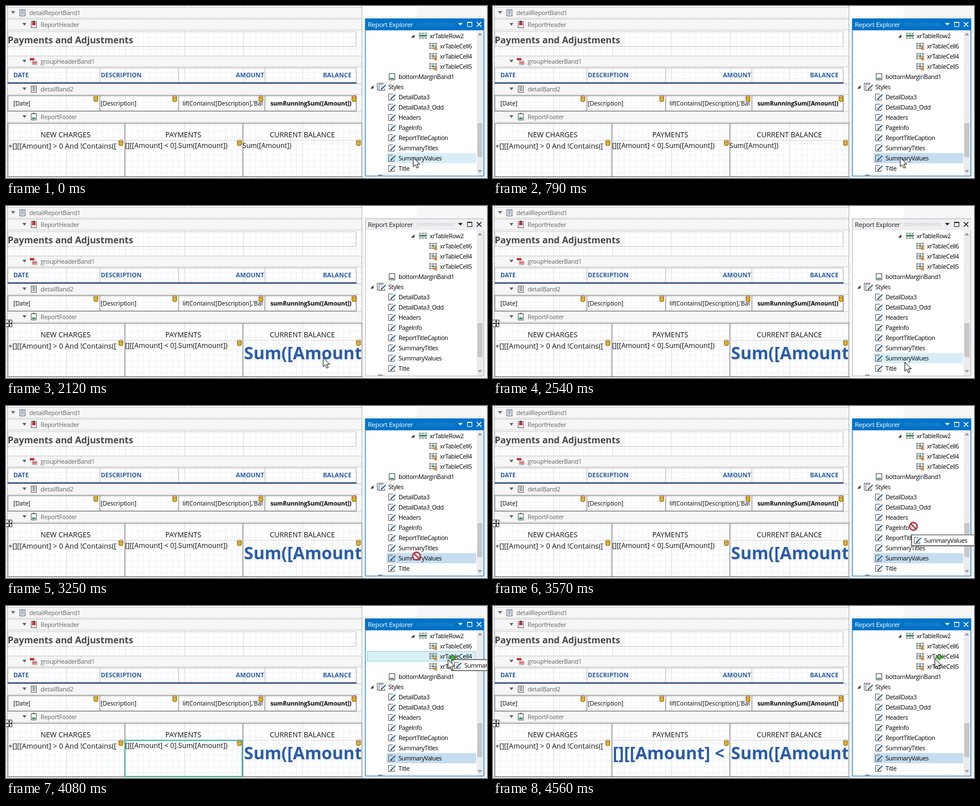
Recreate the animation shown at these times as an HTML page. Size 848 by 304 pixels, loop 5.29 s.

```html
<!DOCTYPE html>
<html lang="en">
<head>
<meta charset="utf-8">
<title>Report designer</title>
<style>
html, body { margin: 0; width: 100%; height: 100%; overflow: hidden; background: #fff; }
svg { display: block; }
text { font-family: "Open Sans", "Noto Sans", sans-serif; white-space: pre; }
.band { font-size: 10.8px; letter-spacing: -.25px; fill: #666; }
.tree { font-size: 10.8px; letter-spacing: -.4px; fill: #000; }
.title { font-size: 11.5px; letter-spacing: -.3px; }
.head { font-size: 10.9px; font-weight: 700; fill: #2a5caa; }
.row { font-size: 10.5px; }
.cell { font-size: 12.7px; fill: #111; }
.big { font-size: 30.2px; font-weight: 700; fill: #2a5caa; }

/* switches */
.show { opacity: 0; animation: 5290ms step-end infinite; }
.hover { animation-name: hover; }
.picked { animation-name: picked; }
.idle { animation-name: idle; }
.active { animation-name: active; }
.sum-small { animation-name: sumSmall; }
.sum-big { animation-name: sumBig; }
.pay-small { animation-name: paySmall; }
.pay-big { animation-name: payBig; }
.handle { animation-name: handle; }
.over-margin { animation-name: overMargin; }
.over-five { animation-name: overFive; }
.over-four { animation-name: overFour; }
.arrow { animation-name: arrow; }
.denied { animation-name: denied; }
.plus { animation-name: plus; }
.tag { animation-name: tag; }
@keyframes hover { 0%, 47.4% { opacity: 1 } 14.93%, 54%, 100% { opacity: 0 } }
@keyframes picked { 0%, 40.07% { opacity: 0 } 14.93%, 54%, 100% { opacity: 1 } }
@keyframes idle { 0%, 54%, 100% { opacity: 0 } 40.07% { opacity: 1 } }
@keyframes active { 0%, 54%, 100% { opacity: 1 } 40.07% { opacity: 0 } }
@keyframes sumSmall { 0% { opacity: 1 } 34.59%, 100% { opacity: 0 } }
@keyframes sumBig { 0% { opacity: 0 } 34.59%, 100% { opacity: 1 } }
@keyframes paySmall { 0% { opacity: 1 } 85.06%, 100% { opacity: 0 } }
@keyframes payBig { 0% { opacity: 0 } 85.06%, 100% { opacity: 1 } }
@keyframes handle { 0% { opacity: 0 } 40.07%, 100% { opacity: 1 } }
@keyframes overMargin { 0%, 73.72%, 100% { opacity: 0 } 71.45% { opacity: 1 } }
@keyframes overFive { 0%, 74.85%, 100% { opacity: 0 } 73.72% { opacity: 1 } }
@keyframes overFour { 0%, 85.06%, 100% { opacity: 0 } 74.85% { opacity: 1 } }
@keyframes arrow { 0%, 30.05%, 71.45%, 100% { opacity: 1 } 26.08%, 61.45% { opacity: 0 } }
@keyframes denied { 0%, 30.05%, 71.45%, 100% { opacity: 0 } 26.08%, 61.45% { opacity: 1 } }
@keyframes plus { 0%, 40.07% { opacity: 0 } 30.05%, 71.45%, 100% { opacity: 1 } 61.43% { opacity: 0 } }
@keyframes tag { 0%, 35.72%, 86.19%, 100% { opacity: 0 } 26.65%, 62% { opacity: 1 } }

/* paths */
.pointer { animation: pointer 5290ms linear infinite; }
.carry { animation: carry 5290ms linear infinite; }
@keyframes pointer {
  0%, 25% { transform: translate(718px, 268px) }
  26.65% { transform: translate(688px, 268px) }
  30.06% { transform: translate(627px, 269px) }
  31.19% { transform: translate(607px, 269px) }
  34.59%, 40% { transform: translate(557px, 268px) }
  44.61% { transform: translate(662px, 271px) }
  48.01%, 50.2% { transform: translate(726px, 276px) }
  54.63%, 60.9% { transform: translate(722px, 270px) }
  67.49% { transform: translate(741px, 213px) }
  70.89% { transform: translate(764px, 138px) }
  73.16% { transform: translate(779px, 119px) }
  74.86% { transform: translate(780px, 98px) }
  78.26%, 100% { transform: translate(779px, 93px) }
}
@keyframes carry {
  0%, 26.65% { transform: translate(675px, 268px) }
  31.19% { transform: translate(618px, 268px) }
  34.59%, 50% { transform: translate(563px, 268px) }
  50.1%, 62% { transform: translate(733px, 269px) }
  67.49% { transform: translate(737px, 227px) }
  70.89% { transform: translate(757px, 152px) }
  73.16% { transform: translate(779px, 123px) }
  76%, 100% { transform: translate(785px, 94px) }
}
</style>
</head>
<body>
<svg id="stage" width="848" height="304" viewBox="0 0 848 304"></svg>
<script>
const rect = (x, y, w, h, fill, more = '') =>
  `<rect x="${x}" y="${y}" width="${w}" height="${h}" fill="${fill}" ${more}/>`;
const box = (x, y, w, h, color, width = 1) =>
  rect(x + .5, y + .5, w, h, 'none', `stroke="${color}" stroke-width="${width}"`);
const path = (d, fill, more = '') => `<path d="${d}" fill="${fill}" ${more}/>`;
const line = (d, color, width = 1, more = '') =>
  path(d, 'none', `stroke="${color}" stroke-width="${width}" ${more}`);
const text = (x, y, cls, str, more = '') =>
  `<text x="${x}" y="${y}" class="${cls}" ${more}>${str.replace(/</g, '&lt;')}</text>`;
const at = (x, y, body) => `<g transform="translate(${x} ${y})">${body}</g>`;
const show = (cls, body) => `<g class="show ${cls}">${body}</g>`;
const END = 'text-anchor="end"', MID = 'text-anchor="middle"';

// icons, centred on 0,0
const sheet = body => rect(-4.5, -5.5, 9, 11, '#fff', 'stroke="#555"') + body;
const bars = (color, ys) => ys.map(y => rect(-2.5, y, 5, 1, color)).join('');
const icons = {
  report: sheet(bars('#3b6fb0', [-4, -2, 0, 2])),
  header: sheet(rect(-3, -4, 6, 5, '#d02c38') + rect(-2, -7, 4, 3, '#555')),
  group: rect(-7, -6, 8, 4, '#d02c38') + rect(-3, -1, 9, 1, '#777') +
    rect(-3, 1, 9, 3, '#d02c38', 'opacity=".75"') + rect(-3, 5, 9, 1, '#777'),
  detail: sheet(bars('#555', [-4, -2, 0, 2])),
  footer: sheet(rect(-3, 1, 6, 3, '#2e8b57') + rect(-2, -7, 4, 2, '#555')),
  margin: rect(-4.5, -5.5, 10, 11, '#fff', 'stroke="#444"') + rect(-3, 2, 7, 2, '#2e8b57'),
  style: line('M2-5.5H-5.5V5.5H4.5V2', '#555') + bars('#bbb', [-3, -1]) +
    line('M0 2L6.5-4.5', '#2b6ca8', 2) + path('M-2.5 4.5L-1.2 1L1 3.2z', '#111'),
  db: path('M-3.5-3.5V3.5Q0 6.5 3.5 3.5V-3.5z', '#f2b21b', 'stroke="#6f4e0c"') +
    '<ellipse cy="-3.5" rx="3.5" ry="1.6" fill="#ffe08a" stroke="#6f4e0c" stroke-width=".9"/>'
};
icons.styles = line('M-4 5.5H-7.5V-6.5H4', '#555') + at(1, 1, icons.style);
const tiles = (cols, color, y) =>
  Array.from({ length: cols }, (_, i) => rect(-7 + i * 5, y, 4, 3, color)).join('');
icons.row = tiles(3, '#aaa', -6) + rect(-7, -2, 14, 3, '#2e8b57') + tiles(3, '#aaa', 2);
icons.cell = tiles(3, '#999', -6) + tiles(3, '#999', -2) + rect(-2, -2, 4, 3, '#2e8b57') +
  tiles(2, '#999', 2) + rect(2, 1, 5, 6, '#d98b3a', 'rx="1.5"');

function band(y, x, icon, name) {
  return rect(3, y - 10, 624, 20, '#f6f6f6') +
    line(`M3 ${y - 9.5}H627M3 ${y + 9.5}H627`, '#c9c9c9') +
    path(`M${x - 32} ${y - 3}h7l-3.5 5z`, '#666') +
    at(x - 12, y, icons[icon]) + text(x, y + 4, 'band', name);
}

function gridLines() {
  let d = '';
  for (let x = 13; x < 627; x += 10.4) d += `M${Math.round(x) + .5} 0V302`;
  for (let y = 3; y < 302; y += 10.4) d += `M3 ${Math.round(y) + .5}H627`;
  return line(d, '#f0f1f3') + line('M106.5 0V302M210.5 0V302M314.5 0V302M418.5 0V302M522.5 0V302', '#e2e5ea');
}

const clipped = (x, w, body) => `<svg x="${x}" y="238" width="${w}" height="63">${body}</svg>`;

function report() {
  return rect(724, 0, 124, 304, '#f7f7f7') + gridLines() +
    band(12, 41, 'report', 'detailReportBand1') +
    band(33, 61, 'header', 'ReportHeader') +
    band(98, 61, 'group', 'groupHeaderBand1') +
    band(147, 61, 'detail', 'detailBand2') +
    band(196, 61, 'footer', 'ReportFooter') +
    line('M2.5 0V304M627.5 0V304', '#999', 1, 'stroke-dasharray="3 1"') +
    line('M0 302.5H633', '#aaa', 1, 'stroke-dasharray="3 1"') +
    box(3, 45, 614, 26, '#c4c4c4') +
    text(3, 66, '', 'Payments and Adjustments', 'font-size="16.1" font-weight="700" fill="#444"') +
    box(3, 109, 614, 27, '#b5b5b5') +
    line('M165.5 109V136M304.5 109V136M456.5 109V136', '#b5b5b5') +
    rect(3, 135, 615, 2, '#1f3d78') +
    text(13, 126, 'head', 'DATE') + text(167, 126, 'head', 'DESCRIPTION') +
    text(455, 126, 'head', 'AMOUNT', END) + text(609, 126, 'head', 'BALANCE', END) +
    box(3, 158, 614, 27, '#777') +
    line('M165.5 158V185M304.5 158V185M456.5 158V185', '#777') +
    text(13, 176, 'row', '[Date]') + text(167, 176, 'row', '[Description]') +
    text(311, 176, 'row', "Iif(Contains([Description],'Bal") +
    text(609, 176, '', 'sumRunningSum([Amount])', END + ' font-size="10.3" font-weight="700"') +
    box(3, 207, 624, 94, '#777') +
    line('M209.5 207V301M417.5 207V301', '#777') + line('M3 237.5H627', '#d5d5d5') +
    text(105, 232, 'cell', 'NEW CHARGES', MID) + text(312.5, 232, 'cell', 'PAYMENTS', MID) +
    text(522.5, 232, 'cell', 'CURRENT BALANCE', MID) +
    text(4, 252, 'cell', '+[][[Amount] > 0 And !Contains([') +
    show('pay-small', text(210, 251, 'cell', '[][[Amount] < 0].Sum([Amount])', 'style="font-size:12.25px"')) +
    show('sum-small', text(417, 251, 'cell', 'Sum([Amount])', 'style="font-size:12.15px"')) +
    show('pay-big', clipped(210, 206, text(1, 33, 'big', '[][[Amount] <'))) +
    show('sum-big', clipped(418, 208, text(1.5, 33, 'big', 'Sum([Amount'))) +
    [[158, 164], [297, 164], [449, 164], [613, 164], [202, 242], [411, 242], [621, 242]]
      .map(([x, y]) => at(x + .5, y, icons.db)).join('') +
    show('over-margin', rect(3, 301, 624, 2, '#3fae9b')) +
    show('over-five', box(417, 237, 209, 64, '#3fae9b', 2)) +
    show('over-four', box(209, 237, 207, 64, '#3fae9b', 2)) +
    show('handle', rect(-.5, 201.5, 11, 12, '#fff', 'stroke="#333"') +
      line('M1 207.5H10M5.5 203V212', '#000', 1.2) +
      path('M5.5 202l2 2.5h-4zM5.5 213l2-2.5h-4zM0 207.5l2.5-2v4zM11 207.5l-2.5-2v4z', '#000'));
}

const overRow = y => rect(636, y - 9, 193, 18, '#d9f0f6') + box(636, y - 9, 192, 17, '#8fd3dd');
const styleRow = color => rect(671, 260, 158, 18, color);

function titleBar(bg, ink, edge) {
  return box(633, 22, 209, 278, edge) +
    rect(634, 23, 209, 20, bg) + text(638, 37, 'title', 'Report Explorer', `fill="${ink}"`) +
    line('M725 30.5H791M725 34.5H791', ink, 1, 'stroke-dasharray="1 3" opacity=".45"') +
    line('M727 32.5H791', ink, 1, 'stroke-dasharray="1 3" opacity=".45"') +
    path('M797 30h8l-4 4.5z', ink) + line('M813.5 28V36.5H821.5V28', ink) +
    rect(813, 28, 9, 2, ink) + line('M830 28.5l8 8m0-8l-8 8', ink, 1.7);
}

function panel() {
  const styles = ['DetailData3', 'DetailData3_Odd', 'Headers', 'PageInfo',
    'ReportTitleCaption', 'SummaryTitles', 'SummaryValues', 'Title'];
  const node = (x, y, icon, name) => at(x - 12, y, icons[icon]) + text(x, y + 4, 'tree', name);
  return show('active', rect(633, 22, 210, 279, '#7fb2dd', 'opacity=".4" filter="url(#soft)"')) +
    rect(633, 22, 210, 279, '#fff') +
    show('active', titleBar('#0173c7', '#fff', '#0173c7')) +
    show('idle', titleBar('#efeff2', '#222', '#b4b4b4')) +
    show('hover', styleRow('#d7eef7')) + show('picked', styleRow('#c5ddf0')) +
    show('over-margin', overRow(125)) + show('over-five', overRow(107)) + show('over-four', overRow(89)) +
    path('M720 50v6h-6zM648 140v6h-6z', '#444') +
    node(747, 53, 'row', 'xrTableRow2') +
    [6, 4, 5].map((n, i) => node(765, 71 + i * 18, 'cell', 'xrTableCell' + n)).join('') +
    node(692, 125, 'margin', 'bottomMarginBand1') + node(674, 143, 'styles', 'Styles') +
    styles.map((s, i) => node(692, 161 + i * 18, 'style', s)).join('') +
    rect(656, 298, 8, 1.5, '#777') +
    rect(830, 44, 12, 256, '#ebebed') + rect(831, 207, 9, 60, '#c6c7cb') +
    path('M831.5 52h8l-4-4.5zM831.5 290h8l-4 4.5z', '#9a9ba5');
}

function dragging() {
  const tag = rect(.75, .75, 158, 19.5, '#fff', 'stroke="#555" stroke-width="1.5"') +
    at(11, 11, icons.style) + text(23, 15, 'tree', 'SummaryValues');
  const arrow = path('M0 0V16L3.7 12.6L6.3 18.5L9 17.3L6.4 11.6H11.4z', '#fff',
    'stroke="#000" stroke-linejoin="round"');
  const denied = '<circle r="6.7" fill="#fff" stroke="#b8202c" stroke-width="2.4"/>' +
    line('M-4.5-4.5L4.5 4.5', '#b8202c', 2.4);
  const plus = path('M6.5-8.5h3v3h3v3h-3v3h-3v-3h-3v-3h3z', '#4fe03a', 'stroke="#0c3d06"');
  return `<g class="carry">${show('tag', tag)}</g><g class="pointer">` +
    show('arrow', arrow) + show('denied', denied) + show('plus', at(0, 1, plus)) + '</g>';
}

document.getElementById('stage').innerHTML =
  '<defs><filter id="soft"><feGaussianBlur stdDeviation="3.5"/></filter></defs>' +
  report() + panel() + dragging();
</script>
</body>
</html>
```
